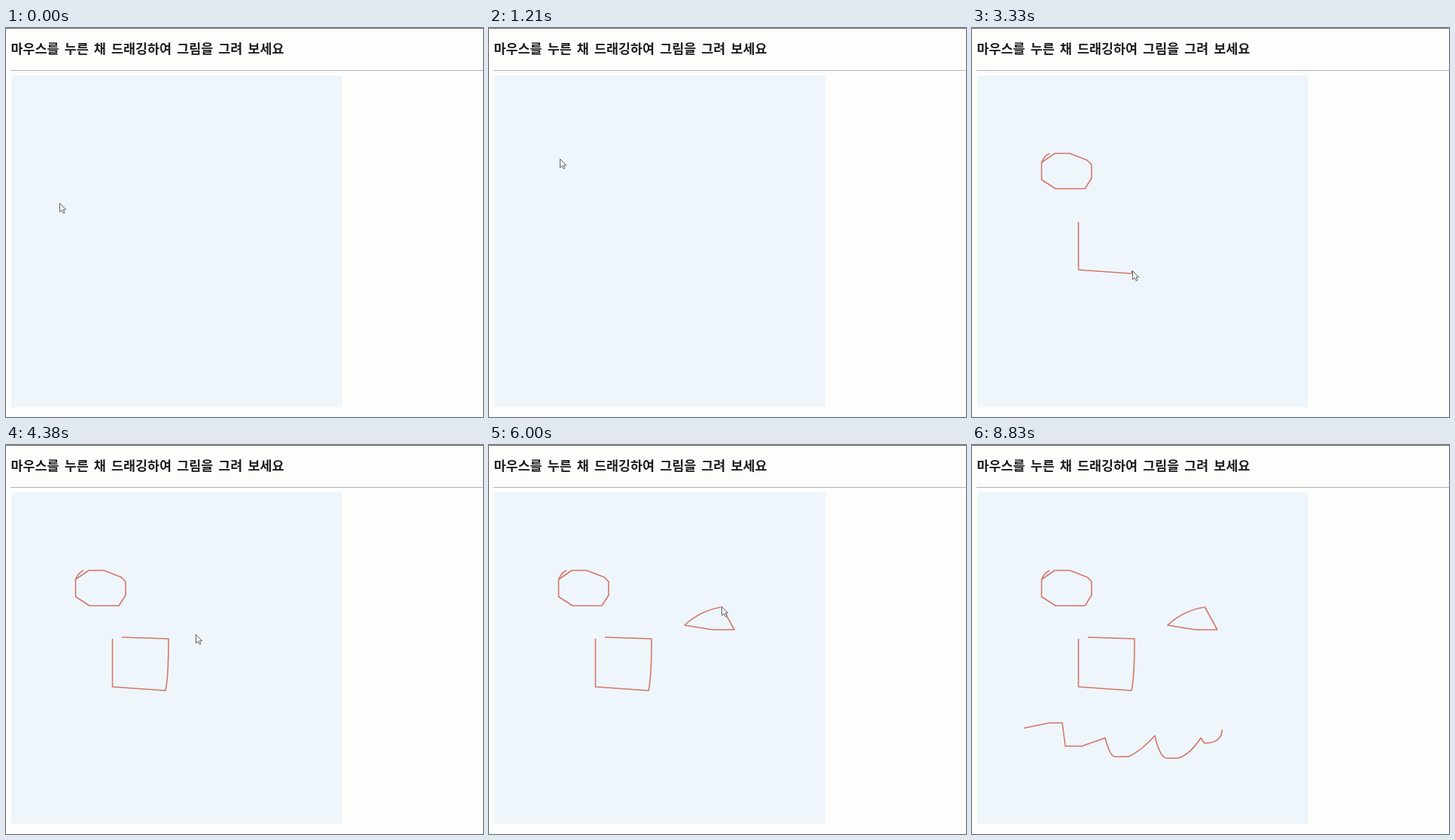
An HTML page for the animation above (8.93 s loop, 634x518 px).

```html
<!DOCTYPE html>
<html lang="ko">
<head>
<meta charset="utf-8">
<style>
html, body { margin: 0; width: 100%; height: 100%; overflow: hidden; background: #fdfefc; }
svg { display: block; }
text { font: 700 17.4px "Noto Sans CJK KR", "Noto Sans CJK", sans-serif; word-spacing: 2.3px; fill: #1c1c20; }
.ink { fill: none; stroke: #d4766a; stroke-width: 1.6; stroke-linejoin: round; }
.hover { visibility: hidden; }
</style>
</head>
<body>
<svg width="634" height="518" viewBox="0 0 634 518">
  <rect width="634" height="1" fill="#6c6c64"/>
  <text x="6.5" y="34">마우스를 누른 채 드래깅하여 그림을 그려 보세요</text>
  <rect x="6" y="56" width="628" height="1" fill="#b0b0bc"/>
  <rect x="7" y="63" width="440" height="442" fill="#eef6fb"/>
  <g id="paper"></g>
  <path id="cursor" d="M.5 .5V12L3.2 9.5L5.2 13.6L7 12.8L5.1 8.8H8.6Z" fill="#fff" stroke="#5c5c60"/>
</svg>
<script>
const LOOP = 8930, CURSOR_GONE = 8810;
let tip = { x: 71, y: 233 };
const legs = [];

// Each leg goes on from where the pointer last stopped.
function leg(kind, from, to, route) {
  const path = document.createElementNS("http://www.w3.org/2000/svg", "path");
  path.setAttribute("d", `M${tip.x} ${tip.y}${route}`);
  path.setAttribute("class", kind);
  paper.append(path);
  const length = path.getTotalLength();
  tip = path.getPointAtLength(length);
  legs.push({ from, to, path, length });
}
const hover = (...args) => leg("hover", ...args);
const ink = (...args) => leg("ink", ...args);

hover(400, 1150, "L94 174");
hover(1260, 1480, "L103 167");
ink(1480, 2420, "Q96 170 92.5 179V202L111 214H150L159 200V182L153 176L130 167H110L92.5 179");
hover(2480, 2800, "L141.5 258");
ink(2840, 3780, "V322L212 327Q216 310 216 258L154 256");
hover(3900, 4380, "L252 252");
hover(4380, 4680, "L308 216");
ink(4720, 5960, "Q280 221 260 240L297 246H326L309 215");
hover(6040, 6420, "L69 377");
ink(6460, 6830, "L103 370H120");
ink(7130, 7500, "L124 401H146L177 390L178 394");
ink(7500, 8790, "Q184 415 190 415H208Q224 408 243 387Q250 417 259 417H274Q290 412 304 390L309 397Q332 397 332.5 379");

function draw(now) {
  const t = now % LOOP;
  tip = legs[0].path.getPointAtLength(0);
  for (const { from, to, path, length } of legs) {
    const done = length * Math.min(1, Math.max(0, (t - from) / (to - from)));
    path.setAttribute("stroke-dasharray", `${done} 9999`);
    if (t >= from) tip = path.getPointAtLength(done);
  }
  cursor.setAttribute("transform", `translate(${Math.round(tip.x)} ${Math.round(tip.y)})`);
  cursor.setAttribute("visibility", t < CURSOR_GONE ? "visible" : "hidden");
}

const start = performance.now();
function tick() {
  draw(performance.now() - start);
  requestAnimationFrame(tick);
}
tick();
</script>
</body>
</html>
```
